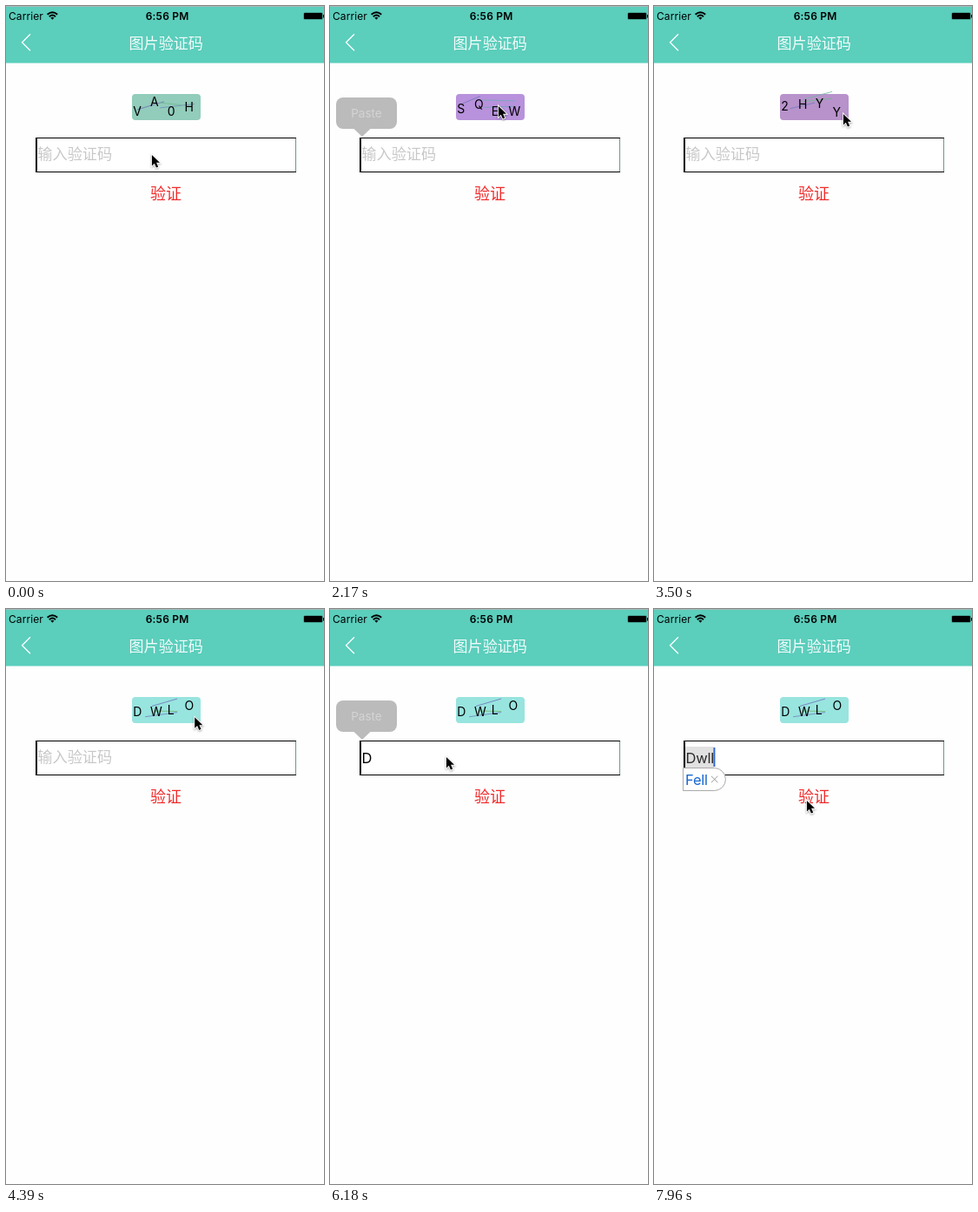
An HTML page for the animation above (8 s loop, 366 px wide and 660 px high).

```html
<!DOCTYPE html>
<html lang="zh-CN">
<head>
<meta charset="utf-8">
<title>图片验证码</title>
<style>
html, body { margin: 0; width: 100%; height: 100%; overflow: hidden; background: #fefefe; }
svg { display: block; width: 100vw; height: 100vh; font-family: Inter, Roboto, sans-serif; }
.cjk { font-family: "Noto Sans CJK SC", "Noto Sans CJK", sans-serif; }
.thin { font-family: "Noto Sans CJK SC Light", "Noto Sans CJK SC DemiLight", "Noto Sans CJK SC", sans-serif; font-weight: 300; }
.code { font-size: 14px; }
.input { font-size: 16.5px; letter-spacing: -.2px; }
#cursor { filter: drop-shadow(0 1px 1px rgba(0, 0, 0, .35)); }
</style>
</head>
<body>
<svg viewBox="0 0 366 660" preserveAspectRatio="none">
  <rect width="366" height="660" fill="#fefefe"/>
  <rect width="366" height="65.5" fill="#5bcebc"/>
  <rect width="366" height="1" fill="#a5bbb6"/>

  <!-- status bar -->
  <text x="3" y="16" font-size="12" letter-spacing=".1">Carrier</text>
  <g fill="none" stroke="#000" stroke-width="1.9">
    <path d="M47.6 9.8Q53.4 4.6 59.2 9.8"/>
    <path d="M49.8 12.2Q53.4 9 57 12.2"/>
  </g>
  <path d="M51.4 13.6Q53.4 12 55.4 13.6L53.4 15.8Z"/>
  <text x="185.6" y="16" font-size="12" font-weight="600" letter-spacing=".2" text-anchor="middle">6:56 PM</text>
  <rect x="342.5" y="7.5" width="22" height="8" rx="1.5" stroke="#5bcebc" stroke-opacity=".6"/>
  <rect x="365" y="10" width="1" height="3.5"/>

  <!-- navigation bar -->
  <path d="M28 32.2L18.5 41.7L28 51.2" fill="none" stroke="#fff" stroke-width="1.3"/>
  <text class="thin" x="141.5" y="49" font-size="17.1" fill="#fff" opacity=".93">图片验证码</text>

  <g id="captcha"></g>

  <!-- input field -->
  <rect x="34.5" y="151.5" width="299" height="39" fill="#fff" stroke="#000"/>
  <rect x="34" y="151" width="2" height="40"/>
  <path d="M333.5 152V190" stroke="#6f958c"/>
  <text id="hint" class="thin" x="36.3" y="176" font-size="17.2" fill="#c8c8ca">输入验证码</text>
  <rect id="mark" x="36" y="158" height="24" fill="#e1e1e1"/>
  <text id="typed" class="input" x="36.5" y="177"></text>
  <rect id="caret" y="159" width="2" height="22" fill="#2f66d0"/>

  <text class="cjk" x="166" y="222" font-size="18" fill="#f12b2b">验证</text>

  <!-- spelling suggestion -->
  <g id="bubble">
    <path id="shell" fill="#fff" stroke="#a9a9a9"/>
    <text id="guess" class="input" x="36" y="202" fill="#1767d0"></text>
    <path id="cross" d="M-3.7 -3.7L3.7 3.7M3.7 -3.7L-3.7 3.7" stroke="#999"/>
  </g>

  <!-- paste menu -->
  <g id="paste">
    <g id="menu" fill="#303030">
      <rect x="7" y="105" width="70" height="36" rx="8"/>
      <path d="M27.5 141H46.5L37 150Z"/>
    </g>
    <text id="label" x="42" y="128" font-size="13.5" text-anchor="middle">Paste</text>
  </g>

  <g id="cursor">
    <path transform="translate(.9 .9) scale(.86)" d="M0 0V14.6L3.4 11.4L5.9 17L8.5 15.8L6 10.4H10.6Z" stroke="#fff" stroke-width="2" paint-order="stroke"/>
  </g>
</svg>
<script>
const LOOP = 8000, FRAME = 147.4, BLINK = 530;
const FOCUS = 1140, REFRESH = 2170;
const KEYS = [6180, 6630, 6920, 7220];
const MENUS = [[FOCUS, 2320], [5440, 6330]];

// characters, background, baselines below the panel's top
const CODES = [
  ["VA0H", "#92ccbb", [25, 14, 25, 20]],
  ["SQEW", "#b892dc", [22, 17, 25, 25]],
  ["KTBM", "#c9b08f", [19, 24, 15, 22]],
  ["2HYY", "#b892cb", [19, 17, 16, 26]],
  ["RNFC", "#a3c98f", [24, 16, 22, 17]],
  ["DWLO", "#98e4df", [22, 22, 20, 15]]
];

// start, end, x, y of each pointer move
const MOVES = [
  [100, 800, 156, 170],
  [1140, 1440, 166, 198],
  [1440, 1880, 193, 114],
  [2170, 2610, 217, 123],
  [4390, 4990, 133, 169],
  [7800, 7950, 175, 219]
];

const $ = id => document.getElementById(id);
const show = (id, on) => $(id).setAttribute("display", on ? "inline" : "none");
const set = (id, attrs) => {
  for (const k in attrs) $(id).setAttribute(k, attrs[k]);
};
const ease = p => p * p * (3 - 2 * p);
const clamp = p => Math.min(1, Math.max(0, p));

function random(seed) {
  return () => {
    seed = (seed * 16807) % 2147483647;
    return seed / 2147483647;
  };
}

function noiseLine(rnd) {
  const x = 149 + 30 * rnd(), y = 106 + 20 * rnd();
  const dx = 12 + 30 * rnd(), dy = 16 * rnd() - 10;
  return `<path d="M${x} ${y}l${dx} ${dy}" stroke="hsl(${90 + 150 * rnd()} 35% 58%)" stroke-width=".8"/>`;
}

function captchaMarkup([chars, fill, rows], seed) {
  const rnd = random(seed * 7919);
  const lines = Array.from({ length: 3 }, () => noiseLine(rnd));
  const letters = [...chars].map((c, i) =>
    `<text class="code" x="${146.3 + 19.7 * i}" y="${101.4 + rows[i]}">${c}</text>`);
  return `<rect x="145" y="101" width="79" height="30" rx="4" fill="${fill}"/>` +
    lines.join("") + letters.join("");
}

// one tap, a pause, then a steady run of taps
function codeIndex(t) {
  if (t < REFRESH) return 0;
  return Math.min(CODES.length - 1, Math.max(1, 2 + Math.floor((t - 3050) / 445)));
}

let shown;
function drawCaptcha(t) {
  const i = codeIndex(t);
  if (i === shown) return;
  shown = i;
  $("captcha").innerHTML = captchaMarkup(CODES[i], i + 1);
}

function drawMenu(t) {
  const open = MENUS.find(([from, to]) => t >= from && t < to);
  show("paste", open);
  if (!open) return;
  const fading = open[1] - t <= 150;
  set("menu", { opacity: fading ? .32 : 1 });
  set("label", { fill: fading ? "#d4d4d4" : "#f2f2f2" });
}

function drawInput(t) {
  const count = KEYS.filter(k => k <= t).length;
  const guess = ["", "", "", "Ell", "Fell"][count];
  $("typed").textContent = "Dwll".slice(0, count);
  set("typed", { fill: guess ? "#2b2b2b" : "#000" });
  const width = count ? $("typed").getComputedTextLength() : 0;
  show("hint", !count);

  // every tap or key restarts the blink
  const last = [FOCUS, REFRESH, ...KEYS].filter(k => k <= t).pop();
  show("caret", Math.floor((t - last) / BLINK) % 2 === 1);
  set("caret", { x: 36.5 + Math.max(.5, width - .7) });

  show("bubble", guess);
  show("mark", guess);
  if (!guess) return;
  set("mark", { width });
  $("guess").textContent = guess;
  const end = 57 + $("guess").getComputedTextLength();
  set("shell", { d: `M33.5 182.5H${end - 13.5}a13 13 0 0 1 0 26H33.5Z` });
  set("cross", { transform: `translate(${end - 13.2} 195.5)` });
}

function drawCursor(t) {
  const now = Math.floor(t / FRAME + .25) * FRAME;
  let x = 167, y = 170;
  for (const [from, to, toX, toY] of MOVES) {
    const p = ease(clamp((now - from) / (to - from)));
    x += (toX - x) * p;
    y += (toY - y) * p;
  }
  set("cursor", { transform: `translate(${x} ${y})` });
}

const start = performance.now();
function tick() {
  const t = (performance.now() - start) % LOOP;
  drawCaptcha(t);
  drawMenu(t);
  drawInput(t);
  drawCursor(t);
  requestAnimationFrame(tick);
}
tick();
</script>
</body>
</html>
```
